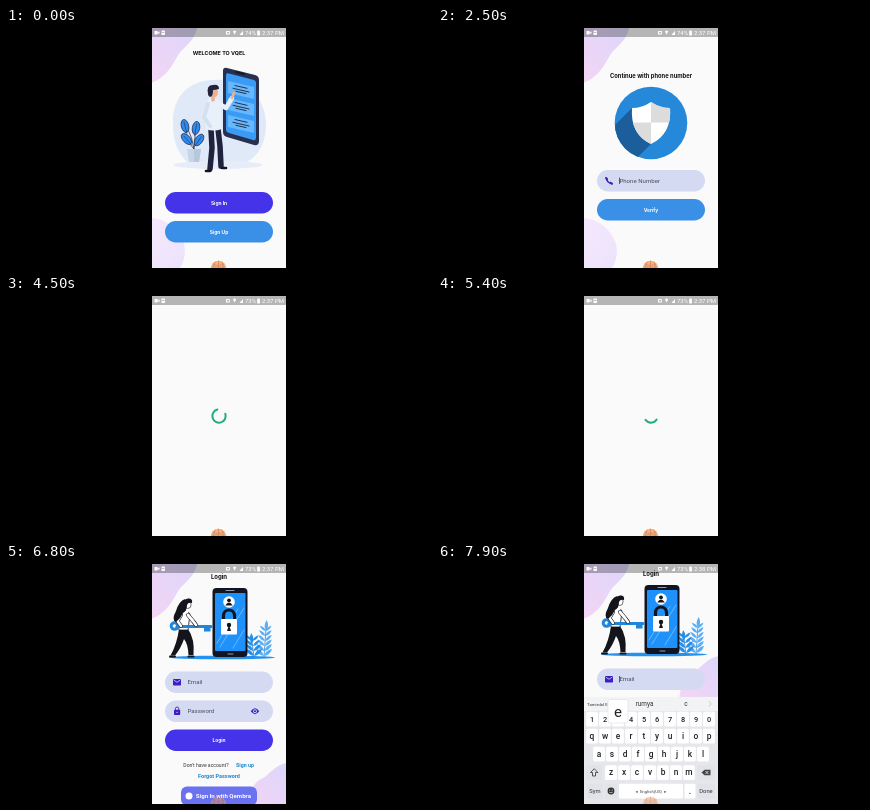
Recreate the animation shown at these times as an HTML page. Size 426 px wide and 240 px high, loop 8 s.

```html
<!DOCTYPE html>
<html lang="en">
<head>
<meta charset="utf-8">
<title>App sign-in walkthrough</title>
<style>
html, body { margin: 0; width: 100%; height: 100%; overflow: hidden; background: #000; }
svg { display: block; width: 100vw; height: 100vh; }
text { font-family: Roboto, "Noto Sans", sans-serif; }
.head { font-family: Inter, "Open Sans", sans-serif; font-weight: 700; }
</style>
</head>
<body>
<svg id="stage" viewBox="0 0 426 240" xmlns="http://www.w3.org/2000/svg"></svg>
<script>
const LOOP = 8000, STEP = 100;
const INDIGO = '#4433e8', BLUE = '#3a8fe7', FIELD = '#d4daf2', ICON = '#3d1fc0', NAVY = '#20233d', INK = '#14151c';

// Markup helpers
const rect = (x, y, w, h, fill, r = 0, more = '') =>
  `<rect x="${x}" y="${y}" width="${w}" height="${h}" rx="${r}" fill="${fill}" ${more}/>`;
const oval = (x, y, rx, fill, ry = rx, more = '') =>
  `<ellipse cx="${x}" cy="${y}" rx="${rx}" ry="${ry}" fill="${fill}" ${more}/>`;
const path = (d, fill, more = '') => `<path d="${d}" fill="${fill}" ${more}/>`;
const line = (d, color, width = 1, more = '') =>
  path(d, 'none', `stroke="${color}" stroke-width="${width}" stroke-linecap="round" stroke-linejoin="round" ${more}`);
const text = (x, y, s, size, fill = '#111', anchor = 'middle', more = '') =>
  `<text x="${x}" y="${y}" font-size="${size}" fill="${fill}" text-anchor="${anchor}" ${more}>${s}</text>`;
const group = (id, body, more = '') => `<g id="${id}" ${more}>${body}</g>`;
const title = (y, s, size = 6) => text(213, y, s, size, '#111', 'middle', 'class="head"');
const button = (y, s, fill) => rect(159, y, 108, 21.5, fill, 10.75) +
  text(213, y + 12.6, s, 4.9, '#fff', 'middle', 'class="head"');

const icons = {
  mail: y => rect(167, y - 3.2, 8, 6.4, ICON, .8) + line(`M168 ${y - 2}l3 2 3-2`, FIELD, .8),
  lock: y => rect(168, y - 1.5, 6.2, 5.3, ICON, .8) + line(`M169.4 ${y - 1.5}v-1a1.7 1.7 0 0 1 3.4 0v1`, ICON, .9) + oval(171.1, y + 1.1, .7, FIELD),
  phone: y => line(`M168.2 ${y - 2.8}q.7 4.8 5.7 5.7`, ICON, 1.5) +
    line(`M168.2 ${y - 2.8}l.9 1.4M173.9 ${y + 2.9}l-1.4-.9`, ICON, 2)
};
const eye = y => path(`M244.8 ${y}q4.2-5.8 8.4 0q-4.2 5.8-8.4 0z`, ICON) +
  oval(249, y, 1.9, FIELD) + oval(249, y, 1.1, ICON);
const field = (y, label, icon, secret) => rect(159, y, 108, 21.5, FIELD, 10.75) +
  icons[icon](y + 10.75) + text(181.4, y + 12.7, label, 6.1, '#4a4c5c', 'start') + (secret ? eye(y + 10.75) : '');
const caret = (id, y) => group(id, rect(181, y + 7.5, .9, 6.5, INDIGO));
const partner = (x, y, w, s) => rect(x, y, w, 19, '#6b72ef', 6) + oval(x + 8, y + 9.5, 3.5, '#fff') +
  text(x + 14.8, y + 11.7, s, 6.1, '#fff', 'start', 'font-weight="600"');
const linkRow = (y, ask, x1, go, x2) => text(x1, y, ask, 5.1, '#333', 'start') +
  text(x2, y, go, 5.3, '#1f86d0', 'start', 'font-weight="700"');

const paper = rect(146, 0, 134, 240, '#fafafa');
const cornerBlob = path('M145 0H191C188 15 177 18 171 29C164 42 157 51 145 55Z', 'url(#pink)');
const lowBlob = path('M145 190C157 191 168 197 175 209C181 219 180 231 173 242H145Z', 'url(#pale)');

function welcomeArt() {
  const leaf = (x, y, turn) => `<g transform="translate(${x} ${y}) rotate(${turn})">` +
    oval(0, 0, 3.7, '#2e8cf0', 6.6, `stroke="${NAVY}" stroke-width=".7"`) + line('M0-4V8', NAVY, .5) + '</g>';
  const card = y => path(`M222 ${y}l26 6v12l-26-6z`, '#66b7fb') +
    line(`M229 ${y + 4.5}l12 2.8M227 ${y + 7.3}l16 3.7M230 ${y + 10.3}l10 2.3`, NAVY, .9);
  return path('M167 96C166 70 181 53 207 52C238 49 260 69 260 96C260 118 249 133 235 136H183C171 125 167 112 167 96Z', '#e0e9f8') +
    oval(212, 137, 45, '#e6edf8', 4) +
    path('M221 40l28 7q4 1 4 5v61q0 5-5 4l-27-8q-4-1-4-5V43q0-4 4-3z', '#29304f') +
    path('M221 45l27 7q2 .5 2 3v54q0 4-3 3l-24-7q-3-1-3-3V47z', '#399bf6') + line('M230 44l8 2', '#151a30', 2) +
    card(53) + card(70) + card(87) +
    line('M188 121Q187 111 181 99M188 121Q189 108 190 98M188 121Q184 115 179 112', NAVY, .7) +
    leaf(179, 98, -14) + leaf(190, 100, 10) + leaf(180.5, 111, -42) + leaf(193, 112, 35) +
    path('M181 121h14l-2 13h-10z', '#c6d6e8') + path('M188 121h7l-2 13h-5z', '#b4c8de') +
    line('M205 101L206 120L204 141M212 101L214 118L215 138', NAVY, 5.5) +
    line('M204 143h-4M216 140h4', '#111426', 2.6) +
    path('M202 71Q209 68 214 73L216 101Q207 104 200 101Q197 84 202 71Z', '#e8f0fa') +
    line('M212 75L220 80L226 70', '#e8f0fa', 4.5) + line('M226 70l2-5', '#eeb18f', 2.6) +
    line('M202 76L198 89L204 98', '#d3e0f0', 4) + line('M207 69v3', '#eeb18f', 3.6) +
    oval(208, 64.5, 4, '#eeb18f', 5) +
    path('M202 66Q200 57 207 57Q213 56 213 61Q209 62 207 62Q207 69 204 69Q202 68 202 66Z', NAVY);
}

function signUpArt() {
  const rows = [58, 65, 72].map(y => rect(209, y, 17, 4.2, '#fff', 1) + line(`M211 ${y + 2.1}h9`, '#5165c5', .8)).join('');
  return path('M179 32Q202 23 231 28Q260 27 257 58Q263 91 244 102H192Q174 91 181 69Q175 46 179 32Z', '#e9e9f6') +
    rect(181, 35, 13, 12, '#f6f6fc', 1, 'stroke="#d3d5ea" stroke-width=".7"') + oval(187.5, 41, 3, '#dcdff1') +
    rect(179, 68, 14, 26, '#dee1f3') + rect(246, 59, 10, 31, '#e0e2f4') +
    rect(205.5, 35, 24, 52, '#5e7ce9', 1.5) + rect(207, 37, 21, 48, '#86a3f5') +
    oval(217.5, 45, 5.5, '#fff') + oval(217.5, 43.5, 1.9, '#3d55bf') + path('M214 49q3.5-5 7 0z', '#3d55bf') +
    rows + rect(212, 79, 11, 3.5, '#334bc4', 1) +
    line('M196 71L204 73L202 91M194 71L201 78L198 92', NAVY, 4) +
    rect(190, 72, 10, 2.5, '#4554b3', 1) + line('M193 75L190 98M198 75L200 98M191 90h8', '#4554b3', .9) +
    path('M193 54Q199 51 202 57L200 72H191Z', '#fff', 'stroke="#a8b0d8" stroke-width=".5"') +
    line('M199 58L204 64L209 60', '#e9a58b', 1.8) + oval(198.5, 50, 2.9, '#e9a58b') +
    path('M194 57Q191 47 198 46Q203 46 201 50Q198 50 198 56Z', NAVY) +
    line('M234 72V97M239 72L240 97', '#3048b8', 4.5) + line('M232 99h3M239 99h3', NAVY, 1.8) +
    path('M232 49Q237 46 242 50L243 75H231Z', '#4868ee') + line('M233 52L229 58L226 55', '#4868ee', 2.8) +
    line('M242 52L245 61L240 66', '#3954d5', 2.8) +
    oval(237, 43, 3, '#e9a58b', 3.7) + path('M233 43Q232 38 237 38Q242 38 241 42Q237 40 233 43Z', NAVY);
}

const shield = 'M213 74Q222 80 232 80Q234 106 213 116Q192 106 194 80Q204 80 213 74Z';
const shieldArt = () => oval(213, 95, 36.3, '#2588d9') +
  `<g clip-path="url(#badge)">${path('M194 80L165 109V145H184L213 116L227 105Z', '#1b5e9b')}</g>` +
  path(shield, '#fff') +
  `<g clip-path="url(#shield)">${rect(213, 72, 22, 22.5, '#dcdcdc') + rect(190, 94.5, 23, 24, '#dcdcdc')}</g>`;

function loginArt() {
  const blade = (x, y, turn, size, fill) =>
    `<g transform="translate(${x} ${y}) rotate(${turn}) scale(${size})">${path('M0 0Q-3.4-5 0-11Q3.4-5 0 0Z', fill)}</g>`;
  const sprig = (x, top, lean, fill) => {
    const count = Math.round((92 - top) / 6);
    let leaves = blade(x + lean, top + 10, lean * 2, 1, fill);
    for (let i = 0; i < count; i++) {
      const cx = x + lean * i / count, cy = 92 - i * 5, size = 1 - i / count * .35;
      leaves += blade(cx, cy, -48, size, fill) + blade(cx, cy, 48, size, fill);
    }
    return line(`M${x} 93L${x + lean} ${top + 8}`, '#1775c3', .7) + leaves;
  };
  return oval(216, 93.5, 53, '#2491ec', 1.8) + sprig(258, 57, 2, '#5aaef5') + sprig(248, 70, -2, '#258fe8') +
    rect(206.5, 24, 35, 69, '#111522', 4) + rect(209, 29, 30.5, 58, '#1e92fa', 1) +
    line('M211 79L232 45M214 83L238 44M227 84L238 66', '#9fd2ff', .6) +
    line('M220 26.5h8M222 90h5', '#8f9caf', 1) +
    oval(223, 38, 5.8, '#fff') + oval(223, 36.3, 1.9, INK) + path('M219.2 41.5q3.8-6 7.6 0z', INK) +
    line('M217.5 56V51.5a5.5 5.5 0 0 1 11 0V56', '#111522', 3.2) + rect(215, 55, 16, 15.5, '#fff', 1) +
    oval(223, 61, 2.2, '#111522') + path('M223 61l2 6h-4z', '#111522') +
    path('M173 65H182Q189 75 187.5 91H182.5Q182 80 178 75Q175 84 169 91.5H164.5Q171 80 173 65Z', INK) +
    line('M164 92.5h5M182.5 92.5h5', INK, 2) +
    path('M174 48Q180 44 184 50L182 66H173Q171 56 174 48Z', '#fff', `stroke="${INK}" stroke-width=".8"`) +
    oval(168.5, 62, 3.3, 'none', 3.3, 'stroke="#2185da" stroke-width="3"') +
    line('M171 62.5H205', '#2185da', 3.2, 'stroke-linecap="butt"') + rect(198, 62, 6.5, 5.5, '#2185da') +
    line('M182 51L187 57L190 61', INK, 4) + line('M182 51L187 57L190 61', '#fff', 2.8) +
    line('M175 51L171.5 57L175 62', INK, 3.8) + line('M175 51L171.5 57L175 62', '#fff', 2.6) +
    line('M181 44v4', '#fff', 2.6) + oval(181.8, 40.5, 3.3, '#fff', 4, `stroke="${INK}" stroke-width=".6"`) +
    path('M178.5 43Q176 35 182 34.5Q187 34 186 39Q182 38 181 41Q181 47 177 49Q175 54 170 58Q165 56 170 47Q173 37 179 35Z', INK);
}

function keyboard() {
  const key = (x, y, s, w = 11.8, size = 8.4) => rect(x - w / 2, y - 7.3, w, 14.8, '#fff', 1.6) +
    text(x, y + 2.8, s, size, '#222', 'middle', 'font-weight="500"');
  const row = (letters, x, y, size) => [...letters].map((s, i) => key(x + 13 * i, y, s, 11.8, size)).join('');
  const soft = (x, y, w, s = '') => rect(x - w / 2, y - 7.3, w, 14.8, '#e1e3e8', 1.6) + text(x, y + 2.2, s, 5.8, '#333');
  return rect(145, 133, 136, 110, '#e6e7eb') + rect(145, 133, 136, 14, '#f2f3f5') +
    text(149, 141.5, 'Tamirdal E', 4.4, '#333', 'start') + text(206.5, 142, 'rumya', 6.4, '#333') +
    text(248, 142, 'c', 6.4, '#333') + line('M271 137.5l2 2.500-2 2.5', '#bbb', .7) +
    row('1234567890', 154, 155, 7.4) + row('qwertyuiop', 154, 172) + row('asdfghjkl', 161, 190) + row('zxcvbnm', 173, 208.5) +
    soft(156, 208.5, 16) + line('M156 205l-3.5 3.500h2v3.500h3v-3.500h2z', '#333', .8) +
    soft(268, 208.5, 17) + path('M263.500 208.5l3-2.800h6v5.600h-6z', '#444') + line('M267.7 207.300l2.4 2.400m0-2.400l-2.4 2.4', '#fff', .7) +
    soft(157, 227, 16, 'Sym') + soft(173, 227, 12) + oval(173, 227, 3.4, '#333') +
    oval(171.8, 226, .5, '#fff') + oval(174.2, 226, .5, '#fff') + line('M171.5 228.3q1.5 1.2 3 0', '#fff', .6) +
    key(213, 227, '', 64) + text(213, 228.6, '◂&#160; English(US) &#160;▸', 4.3, '#444') +
    key(252, 227, '.', 11) + soft(268, 227, 18, 'Done') +
    group('popup', rect(170, 135.5, 20, 23.5, '#fff', 2, 'stroke="#d5d7dc" stroke-width=".5"') + text(180, 152.5, 'e', 15, '#222'));
}

const statusBar = rect(146, 0, 134, 9, '#000', 0, 'id="bar"') +
  rect(148.5, 3, 3.2, 3.4, '#fff', .5) + path('M151.5 4.700l2-1.500v3z', '#fff') + rect(155.5, 2.5, 3.4, 4.5, '#fff', .6) +
  line('M156.5 4.5h1.4', '#888', .6) +
  rect(220, 3, 3.8, 3.5, '#fff', .6) + oval(222, 4.7, .8, '#888') +
  path('M227 3.2q1.600-1.200 3.200 0l-1.6 3.6z', '#fff') + path('M233.500 7l3.500-4.200v4.2z', '#fff') +
  text(239, 7, '', 6, '#fff', 'start', 'id="battery"') + rect(251.2, 2.5, 2.7, 5, '#fff', .4) +
  text(278, 7, '', 6, '#fff', 'end', 'id="clock"');

const pages = {
  welcome: cornerBlob + lowBlob + title(27, 'WELCOME TO VQEL', 5.4) + welcomeArt() +
    button(164, 'Sign In', INDIGO) + button(193, 'Sign Up', BLUE),
  signUp: cornerBlob + lowBlob + path('M232 0Q236 14 248 19Q257 25 260 36Q267 51 281 52V0Z', 'url(#pale)') +
    title(15.3, 'Sign Up') + signUpArt() + field(117, 'Email', 'mail') + field(146, 'Password', 'lock', true) +
    button(175.5, 'Sign up', BLUE) + linkRow(207.8, 'Already have account?', 176, 'Sign in', 234) +
    partner(173.5, 216, 79, 'Sign Up with Qembra'),
  phone: cornerBlob + lowBlob + title(49.5, 'Continue with phone number', 5.8) + shieldArt() +
    field(142, 'Phone Number', 'phone') + caret('phoneCaret', 142) + button(171, 'Verify', BLUE),
  loading: line('', '#20ae7e', 2, 'id="spinner" stroke-linecap="butt"'),
  login: cornerBlob + group('lowRight', path('M281 199C269 201 265 209 257 214C246 219 243 229 241 242H281Z', 'url(#pink)')) +
    group('form', title(15.3, 'Login') + loginArt() + field(107.5, 'Email', 'mail') + caret('mailCaret', 107.5) +
      field(136.5, 'Password', 'lock', true) + button(165.5, 'Login', INDIGO) +
      linkRow(203, "Don't have account?", 177.3, 'Sign up', 230) +
      text(213, 214, 'Forgot Password', 5.5, '#1f86d0', 'middle', 'font-weight="700"') +
      partner(175, 222.5, 76, 'Sign In with Qembra')) +
    group('keys', keyboard())
};
const starts = { welcome: -1000, signUp: 600, phone: 1800, loading: 3500, login: 6400 };

const stage = document.getElementById('stage');
stage.innerHTML = `<defs>
  <linearGradient id="pink" x1="1" y1="0" x2="0" y2="1"><stop stop-color="#ddd6fb"/><stop offset="1" stop-color="#f3d5f5"/></linearGradient>
  <linearGradient id="pale" x1="0" y1="0" x2="1" y2="1"><stop stop-color="#f5e7fc"/><stop offset="1" stop-color="#ebe3fc"/></linearGradient>
  <clipPath id="screen"><rect x="146" width="134" height="240"/></clipPath>
  <clipPath id="badge"><circle cx="213" cy="95" r="36.3"/></clipPath>
  <clipPath id="shield"><path d="${shield}"/></clipPath>
  </defs>` + rect(0, 0, 426, 240, '#000') + '<g clip-path="url(#screen)">' +
  Object.entries(pages).map(([id, body]) => group(id, paper + body)).join('') +
  rect(146, 0, 134, 240, '#000', 0, 'id="scrim"') + statusBar +
  group('bubble', oval(212.5, 240.5, 7.8, '#f2aa6c') +
    line('M207 236q5.5 3 11 0M206 239h13M212.5 233v8M209 234q-2 3-1 7M216 234q2 3 1 7', '#cf6a42', .7)) + '</g>';

const $ = id => document.getElementById(id);
const clamp = v => Math.min(1, Math.max(0, v));
const ease = v => v * v * (3 - 2 * v);
const ramp = (t, from, length) => ease(clamp((t - from) / length));
const set = (id, name, value) => $(id).setAttribute(name, value);
const shiftY = (id, y) => set(id, 'transform', `translate(0 ${y})`);

function sweep(t) {
  const cycles = t / 1333 + .16, p = cycles % 1;
  const head = ease(clamp(2 * p)), tail = ease(clamp(2 * p - 1));
  return { start: 270 * (Math.floor(cycles) + tail) + t * 360 / 2222, length: 10 + 270 * (head - tail) };
}
const turnOffset = -20 - sweep(4500).start;

function drawSpinner(t) {
  const { start, length } = sweep(t);
  const point = deg => {
    const a = (deg + turnOffset) * Math.PI / 180;
    return `${213 + 6.7 * Math.cos(a)} ${120 + 6.7 * Math.sin(a)}`;
  };
  set('spinner', 'd', `M${point(start)}A6.7 6.7 0 ${length > 180 ? 1 : 0} 1 ${point(start + length)}`);
}

function draw(t) {
  for (const id in pages) {
    const k = ramp(t, starts[id], 200);
    set(id, 'opacity', k);
    set(id, 'visibility', k ? 'visible' : 'hidden');
    shiftY(id, 14 * (1 - k));
  }
  drawSpinner(t);

  const dim = ramp(t, 5600, 200) * (1 - ramp(t, 6300, 200));
  set('scrim', 'opacity', .6 * dim);
  set('bar', 'opacity', .28 + .72 * dim);
  set('bubble', 'opacity', t >= 6500 ? .5 : .85);

  const up = ramp(t, 7200, 200);
  shiftY('keys', 107 * (1 - up));
  shiftY('form', -3 * up);
  shiftY('lowRight', -107 * up);
  set('popup', 'opacity', t >= 7800 ? 1 : 0);

  const blink = Math.floor(t / 500) % 2;
  set('phoneCaret', 'opacity', blink);
  set('mailCaret', 'opacity', t >= 7200 ? blink : 0);
  $('battery').textContent = t < 3500 ? '74%' : '73%';
  $('clock').textContent = t < 7400 ? '2:37 PM' : '2:38 PM';
}

const origin = performance.now();
function tick() {
  const t = (performance.now() - origin) % LOOP;
  draw(Math.floor(t / STEP) * STEP);
  requestAnimationFrame(tick);
}
tick();
</script>
</body>
</html>
```
